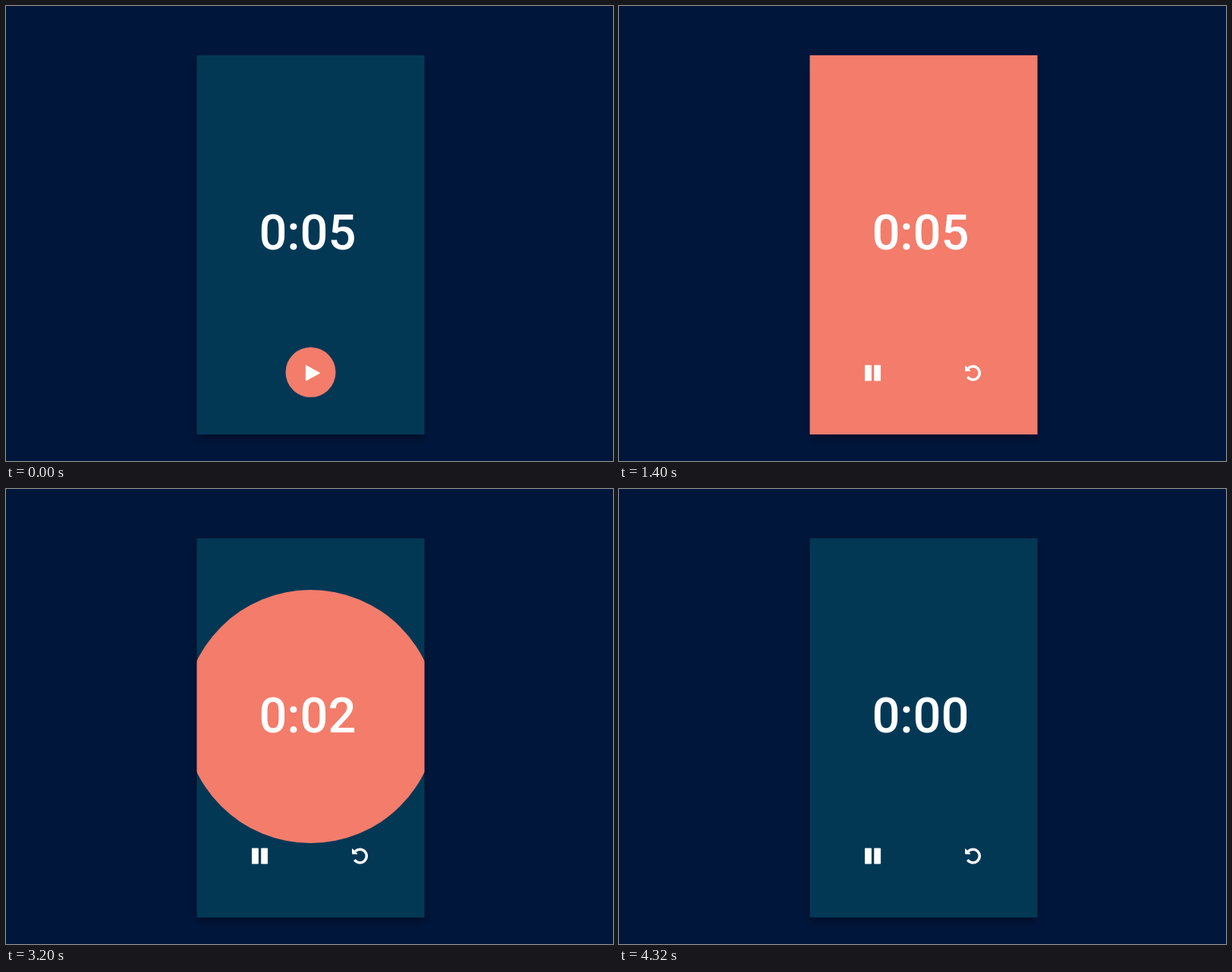
Recreate the animation shown at these times as an HTML page. Size 800 by 600 pixels, loop 4.8 s.

```html
<!DOCTYPE html>
<html lang="en">
<head>
<meta charset="utf-8">
<title>Timer</title>
<style>
  html, body { margin: 0; width: 100%; height: 100%; overflow: hidden; background: #00173b; }
  svg { display: block; width: 800px; height: 600px; }
  .card { fill: #033855; filter: drop-shadow(0 6px 6px rgba(0, 0, 20, .4)); }
  text { font: 500 65px Roboto, sans-serif; fill: #fff; }
</style>
</head>
<body>
<svg viewBox="0 0 800 600">
  <clipPath id="clip"><rect x="251.5" y="65" width="300" height="500"/></clipPath>
  <rect class="card" x="251.5" y="65" width="300" height="500"/>
  <g clip-path="url(#clip)"><circle id="disc" cx="401.5" fill="#f37c6b"/></g>
  <text id="now" y="321"></text>
  <text id="next" y="321">0:00</text>
  <path id="play" fill="#fff" stroke="#fff" stroke-width=".8" stroke-linejoin="round"/>
  <g id="reset" fill="#fff" stroke="#fff">
    <path d="M-6.2-6.2A8.75 8.75 0 1 1-7.1 5.1" fill="none" stroke-width="3.5"/>
    <path d="M-10-9.3V-2.9H-3.5Z" stroke-width="1" stroke-linejoin="round"/>
  </g>
</svg>
<script>
const LOOP = 4800, TICK = 40, START = 1400, SECOND = 560, END = 4120;
const $ = id => document.getElementById(id);
const [disc, now, next, play, reset] = ['disc', 'now', 'next', 'play', 'reset'].map($);

const clamp = v => Math.min(1, Math.max(0, v));
const span = (t, a, b) => clamp((t - a) / (b - a));
const mix = (a, b, p) => a + (b - a) * p;
const easeInOut = (p, n) => p < .5 ? (2 * p) ** n / 2 : 1 - (2 - 2 * p) ** n / 2;

// The two halves of the play triangle turn into the two pause bars.
const triangle = [
  [[-6.2, -10.3], [3.1, -5], [3.1, 5], [-6.2, 10.3]],
  [[3.1, -5], [12.2, 0], [12.2, 0], [3.1, 5]]
];
const bar = (a, b) => [[a, -10.1], [b, -10.1], [b, 10.1], [a, 10.1]];
const bars = [bar(-10.1, -2.1), bar(2.1, 10.1)];

function morph(p) {
  return triangle.map((quad, i) => 'M' + quad.map(([x, y], j) =>
    [mix(x, bars[i][j][0], p), mix(y, bars[i][j][1], p)]).join('L') + 'Z').join('');
}

function discRadius(t) {
  const left = Math.max(0, END - t);
  return left * (.1777 + 4.2e-6 * left);
}

function draw(t) {
  const grow = easeInOut(span(t, 960, START), 3);
  disc.setAttribute('cy', mix(483, 300, grow));
  disc.setAttribute('r', t < START ? mix(33, discRadius(START), grow) : discRadius(t));

  const split = easeInOut(span(t, 920, START), 2);
  play.setAttribute('d', morph(split));
  play.setAttribute('transform', `translate(${mix(401.5, 334.5, split)} 484)`);
  reset.setAttribute('transform', `translate(${mix(401.5, 466.5, split)} 484)`);
  reset.setAttribute('opacity', split);

  const passed = Math.max(0, Math.floor((t - START) / SECOND));
  const digit = Math.max(1, 5 - passed);
  const fade = span(t, END, END + 200);
  now.textContent = '0:0' + digit;
  now.setAttribute('x', digit === 4 ? 331.5 : 333.4);
  now.setAttribute('opacity', 1 - fade);
  next.setAttribute('x', 333.4);
  next.setAttribute('opacity', fade);
}

function frame() {
  draw(Math.floor(performance.now() % LOOP / TICK) * TICK);
  requestAnimationFrame(frame);
}
frame();
</script>
</body>
</html>
```
